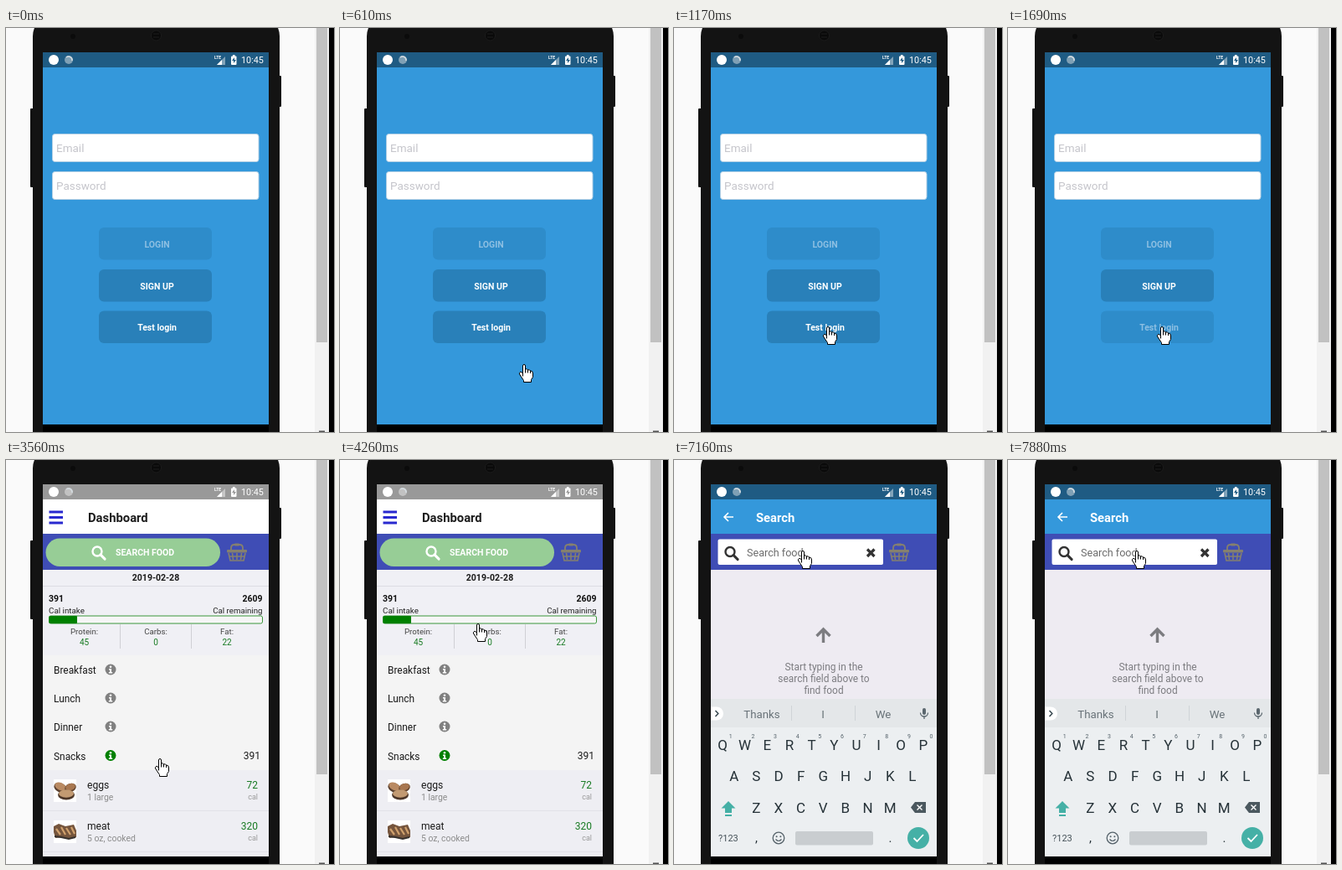
An HTML page that plays this animation: 392 px wide and 482 px high, repeating every 8000 ms.

```html
<!DOCTYPE html>
<html lang="en">
<head>
<meta charset="utf-8">
<title>Food diary app</title>
<style>
html, body { margin: 0; width: 100%; height: 100%; overflow: hidden; background: #fafafa; }
svg { display: block; width: 392px; height: 482px; font-family: Roboto, sans-serif; }
</style>
</head>
<body>
<svg id="stage" viewBox="0 0 392 482"></svg>
<script>
const LOOP = 8000;
const stage = document.getElementById('stage');

const rect = (x, y, w, h, fill, r = 0, extra = '') =>
  `<rect x="${x}" y="${y}" width="${w}" height="${h}" rx="${r}" fill="${fill}" ${extra}/>`;
const circle = (x, y, r, fill, extra = '') =>
  `<circle cx="${x}" cy="${y}" r="${r}" fill="${fill}" ${extra}/>`;
const line = (d, color, width = 1, extra = '') =>
  `<path d="${d}" fill="none" stroke="${color}" stroke-width="${width}" ${extra}/>`;
const shape = (d, fill) => `<path d="${d}" fill="${fill}"/>`;
const text = (x, y, str, size, fill, anchor = 'start', weight = 400, extra = '') =>
  `<text x="${x}" y="${y}" font-size="${size}" fill="${fill}" text-anchor="${anchor}" font-weight="${weight}" ${extra}>${str}</text>`;
const group = (id, content) => `<g id="${id}">${content}</g>`;

function device() {
  return rect(0, 0, 392, 482, '#fafafa')
    + rect(369, 0, 17, 482, '#f1f1f1') + rect(371, 0, 13, 375, '#c1c1c1')
    + rect(386, 0, 6, 482, '#000') + rect(374, 480.5, 7, 2, '#505050')
    + rect(29, 96, 5, 94, '#111', 1) + rect(325, 57, 4, 37, '#111', 1)
    + rect(32, -17, 295, 540, '#131313', 27)
    + circle(80, 10, 3, '#0b0b0b') + circle(179.5, 9, 6, '#0a0a0a', 'stroke="#1c1c1c"')
    + line('M176 7h7M176 11h7', '#1d1d1d')
    + rect(44, 473, 270, 9, '#000');
}

function statusBar(fill, spinner) {
  return rect(44, 29, 270, 18, fill)
    + circle(57, 38, 6, '#fff')
    + circle(75, 38, 5, spinner) + line('M72 35a4.3 4.3 0 0 1 7 4', '#d5dde2', 1.5)
    + text(249, 36.5, 'LTE', 5, '#fff', 'start', 700)
    + shape('M252 44L262 34V44Z', '#ffffff70') + shape('M252 44L258 38V44Z', '#fff')
    + rect(269, 33.5, 6.5, 10.5, '#fff', 1) + rect(271, 32, 2.5, 2, '#fff')
    + shape('M273 35l-3 4h2v3l3-4h-2z', fill)
    + text(281, 42, '10:45', 10.8, '#fff');
}

const lens = (x, y, r, color) =>
  circle(x, y, r, 'none', `stroke="${color}" stroke-width="2.4"`)
  + line(`M${x + r * .75} ${y + r * .75}l5 5`, color, 3, 'stroke-linecap="round"');

const basket = x => `<g transform="translate(${x} 99)">`
  + line('M5 9V6Q5 2 9 2H15Q19 2 19 6V9', '#85806f', 1.8)
  + rect(9, .5, 6, 3, '#85806f', 1) + rect(0, 8, 24, 3.5, '#85806f', 1)
  + line('M2 12L4 21H20L22 12M6.5 12L7.5 20M12 12V20M17.5 12L16.5 20M3 16H21', '#85806f', 1.6)
  + '</g>';

function login() {
  const input = (y, label) => rect(55.5, y, 246.5, 33, '#fff', 3, 'stroke="#b5d0e4"')
    + text(60, y + 21.5, label, 13.5, '#c5c5cb');
  const button = (y, label, bg, ink, id) =>
    rect(111, y, 135, 38.5, bg, 6, `id="${id}Bg"`)
    + text(180.5, y + 23.7, label, 10.5, ink, 'middle', 700, `id="${id}Ink"`);
  return rect(44, 29, 270, 444, '#3498db') + statusBar('#1f5b83', '#7fa0b5')
    + input(126.5, 'Email') + input(171.5, 'Password')
    + button(238, 'LOGIN', '#2e8cca', '#8dbfe2', 'login')
    + button(288, 'SIGN UP', '#2980b9', '#fff', 'signup')
    + button(337.5, 'Test login', '#2980b9', '#fff', 'test');
}

function dashboard() {
  const green = '#177a22';
  const nutrient = (x, label, value) => text(x, 208, label, 9.7, '#444', 'middle')
    + text(x, 221, value, 10, green, 'middle');
  const meal = (y, label, color) => text(57, y + 5, label, 11.9, '#1a1a1a')
    + circle(125, y, 6.5, color) + circle(125, y - 3.3, 1.3, '#fff')
    + shape(`M123 ${y - 1}h3v4h1.2v1.4h-4.4v-1.4h1.2v-2.6h-1z`, '#fff');
  const food = (y, name, amount, cal) => rect(57, y, 27, 27, '#fff')
    + text(97, y + 11, name, 12.1, '#1a1a1a') + text(97, y + 25, amount, 10.4, '#8c8c8c')
    + text(301, y + 11, cal, 12, green, 'end') + text(301, y + 24, 'cal', 9, '#999', 'end')
    + rect(44, y + 37, 270, 1, '#e2e2e8');
  const ellipse = (x, y, rx, ry, fill, turn = 0) =>
    `<ellipse rx="${rx}" ry="${ry}" fill="${fill}" transform="translate(${x} ${y}) rotate(${turn})"/>`;
  const eggs = ellipse(65, 391, 8, 5.5, '#5a4030', 25) + ellipse(65, 389.5, 7, 4.5, '#b98a62', 25)
    + ellipse(77, 391, 7, 5, '#65462f', -20) + ellipse(77, 390, 6, 4, '#a87750', -20)
    + ellipse(72, 399.5, 10, 6, '#4d3729') + ellipse(72, 398, 9, 4.7, '#c29a72');
  const meat = shape('M57 437l6-3 8 3 10-2 3 7v8l-8 2-9-2-8 1-2-7z', '#75553d')
    + line('M60 440l5 7M66 438l5 9M72 439l5 8M78 438l4 8', '#d0a16d', 2.2)
    + line('M58 449l8 1 9 2 8-2', '#35302d', 2);

  return rect(44, 29, 270, 444, '#f4f4f4') + statusBar('#999', '#c2c2c2')
    + rect(44, 47, 270, 41, '#fff') + line('M51.5 62H68M51.5 68.5H68M51.5 75H68', '#2929cf', 3)
    + text(98, 74, 'Dashboard', 14.8, '#1c1c1c', 'start', 700)
    + rect(44, 88, 270, 43, '#3f4db5')
    + rect(47.5, 93.5, 208.5, 33.5, '#97cd96', 16.7)
    + lens(109, 109, 5.5, '#fff') + text(131, 114, 'SEARCH FOOD', 10.5, '#fff', 'start', 700)
    + basket(264)
    + rect(44, 131, 270, 102, '#f0f0f5') + rect(44, 150, 270, 1, '#dcdce3')
    + text(179, 144, '2019-02-28', 10.5, '#1a1a1a', 'middle', 700)
    + text(51, 169, '391', 10.5, '#111', 'start', 700) + text(306.5, 169, '2609', 10.5, '#111', 'end', 700)
    + text(51, 183, 'Cal intake', 9.8, '#222') + text(306.5, 183, 'Cal remaining', 9.7, '#222', 'end')
    + rect(51.5, 186, 255, 9, '#f6f6f6', 2, 'stroke="#3b963b"') + rect(51.5, 186, 33.5, 9, '#008000', 1)
    + rect(136, 196, 1, 29, '#d0d0d5') + rect(221, 196, 1, 29, '#d0d0d5')
    + nutrient(93.5, 'Protein:', 45) + nutrient(179, 'Carbs:', 0) + nutrient(264, 'Fat:', 22)
    + meal(250, 'Breakfast', '#808080') + meal(284, 'Lunch', '#808080')
    + meal(318, 'Dinner', '#808080') + meal(352.5, 'Snacks', '#008000')
    + text(304, 357, '391', 12, '#1a1a1a', 'end')
    + rect(44, 370, 270, 103, '#eeeef3')
    + food(381, 'eggs', '1 large', 72) + eggs + food(430, 'meat', '5 oz, cooked', 320) + meat;
}

function search() {
  const ink = '#263238', teal = '#45b0a6';
  const keys = (letters, x0, y) => [...letters].map((c, i) =>
    text(x0 + i * 26.65, y, c, 17, ink, 'middle')).join('');
  const digits = [...'1234567890'].map((c, i) =>
    text(67.7 + i * 26.65, 331.5, c, 7, '#55626a', 'middle')).join('');
  const hint = (y, str) => text(179, y, str, 11.9, '#7c7c80', 'middle');
  const keyboard = rect(44, 285, 270, 188, '#eceff1') + rect(44, 285, 270, 34, '#e4e7e9')
    + shape('M44 294.5H51A8 8 0 0 1 51 310.5H44Z', '#fff') + line('M49.5 299l3.3 3.5-3.3 3.5', '#37474f', 1.5)
    + text(105, 308, 'Thanks', 13.3, '#687278', 'middle') + text(178, 308, 'I', 13.3, '#687278', 'middle')
    + text(250, 308, 'We', 13.3, '#687278', 'middle')
    + rect(140, 293, 1, 18, '#cfd4d7') + rect(216, 293, 1, 18, '#cfd4d7')
    + rect(297, 296, 4, 8, '#5b676e', 2) + line('M294.5 301.5a4.5 4.5 0 0 0 9 0M299 306v3', '#5b676e', 1.3)
    + keys('QWERTYUIOP', 58, 346) + digits + keys('ASDFGHJKL', 71.7, 383) + keys('ZXCVBNM', 98.3, 421)
    + shape('M65 407l8.5 8.5H69V421H61V415.5H56.5Z', teal) + rect(61, 423, 8, 2, teal)
    + shape('M283 414.5L288 408H301V421H288Z', '#4b585f') + line('M290.5 411.5l6 6m0-6l-6 6', '#fff', 1.4)
    + text(53, 455, '?123', 11, '#455158') + text(98.5, 456, ',', 15, ink, 'middle')
    + circle(125, 451, 6.8, 'none', 'stroke="#55626a" stroke-width="1.3"')
    + circle(122.6, 449.3, 1, '#55626a') + circle(127.4, 449.3, 1, '#55626a')
    + line('M121.5 452.5q3.5 4 7 0', '#55626a', 1.2)
    + rect(145, 443, 93, 16.5, '#c9cdd0', 2) + text(258.5, 456, '.', 15, ink, 'middle')
    + circle(292, 451, 13, teal) + line('M286.5 451l4 4 7.5-8', '#fff', 1.8);

  return rect(44, 29, 270, 444, '#eeebf2') + statusBar('#1f5b83', '#7fa0b5')
    + rect(44, 47, 270, 41, '#3498db')
    + line('M71 68H60M65 63l-5 5 5 5', '#fff', 1.6)
    + text(98, 73.5, 'Search', 14.8, '#fff', 'start', 700)
    + rect(44, 88, 270, 43, '#3f4db5') + rect(52.5, 94.5, 197.5, 30.5, '#fff', 2)
    + lens(67, 109.5, 5.5, '#333') + text(87, 115, 'Search food', 12.6, '#6c6c6c')
    + rect(87.5, 101, 1.6, 19, '#45a09a', 0, 'id="caret"')
    + line('M231 106.5l8.5 8.5m0-8.5l-8.5 8.5', '#333', 3.2)
    + basket(257)
    + line('M178.5 218V203M170.5 210l8-8 8 8', '#7c7c80', 3.4)
    + hint(251, 'Start typing in the') + hint(265, 'search field above to') + hint(279, 'find food')
    + keyboard;
}

const hand = `<g transform="translate(-4 0)">
  <path d="M4.5 14.5V2Q4.5 .5 6 .5T7.5 2V6Q9.5 5 10.5 7Q12.5 6 13.5 8Q16.5 8 16.5 11V15.5L14.5 18.5V21.5H5.5V19.5L.5 12V10.5Q1 9 3 9.5L4.5 11.5" fill="#fff" stroke="#000"/>
  <path d="M7.5 6V10.5M10.5 7V10.5M13.5 8V11" stroke="#000"/></g>`;

stage.innerHTML = device() + group('loginPage', login()) + group('dashPage', dashboard())
  + group('searchPage', search())
  + group('pointer', circle(0, 0, 12, '#ff0', 'id="halo" fill-opacity=".47"') + hand);

const el = id => document.getElementById(id);
const show = (id, on) => el(id).setAttribute('visibility', on ? 'visible' : 'hidden');
const display = (id, on) => el(id).setAttribute('display', on ? 'inline' : 'none');
const between = (t, a, b) => t >= a && t < b;
const clamp = v => Math.min(1, Math.max(0, v));
const mix = (a, b, p) => Math.round(a + (b - a) * p);

// The pointer moves in sampled steps, as a screen recorder sees it.
function pointerAt(t) {
  if (t < 3860) {
    const p = clamp(Math.floor((t - 360) / 78.7) / 8);
    const eased = 1 - (1 - p) ** 2;
    return [mix(275, 182, eased), mix(470, 356, eased)];
  }
  const p = clamp((Math.floor((t - 3860) / 77) + 1) / 10);
  const eased = p * p * (3 - 2 * p);
  return [mix(182, 152, eased), mix(356, 108, eased)];
}

function draw(t) {
  display('loginPage', t < 3560);
  display('dashPage', between(t, 3560, 7160));
  display('searchPage', t >= 7160);
  el('testBg').setAttribute('fill', t < 1540 ? '#2980b9' : '#2e8cca');
  el('testInk').setAttribute('fill', t < 1540 ? '#fff' : t < 1690 ? '#9ac7e6' : '#8dbfe2');
  display('caret', between(t, 7720, 7880));
  display('pointer', t >= 360);
  el('pointer').setAttribute('transform', `translate(${pointerAt(t)})`);
  show('halo', between(t, 1070, 1170) || between(t, 4630, 4710));
}

const start = performance.now();
function tick() {
  draw((performance.now() - start) % LOOP);
  requestAnimationFrame(tick);
}
tick();
</script>
</body>
</html>
```
